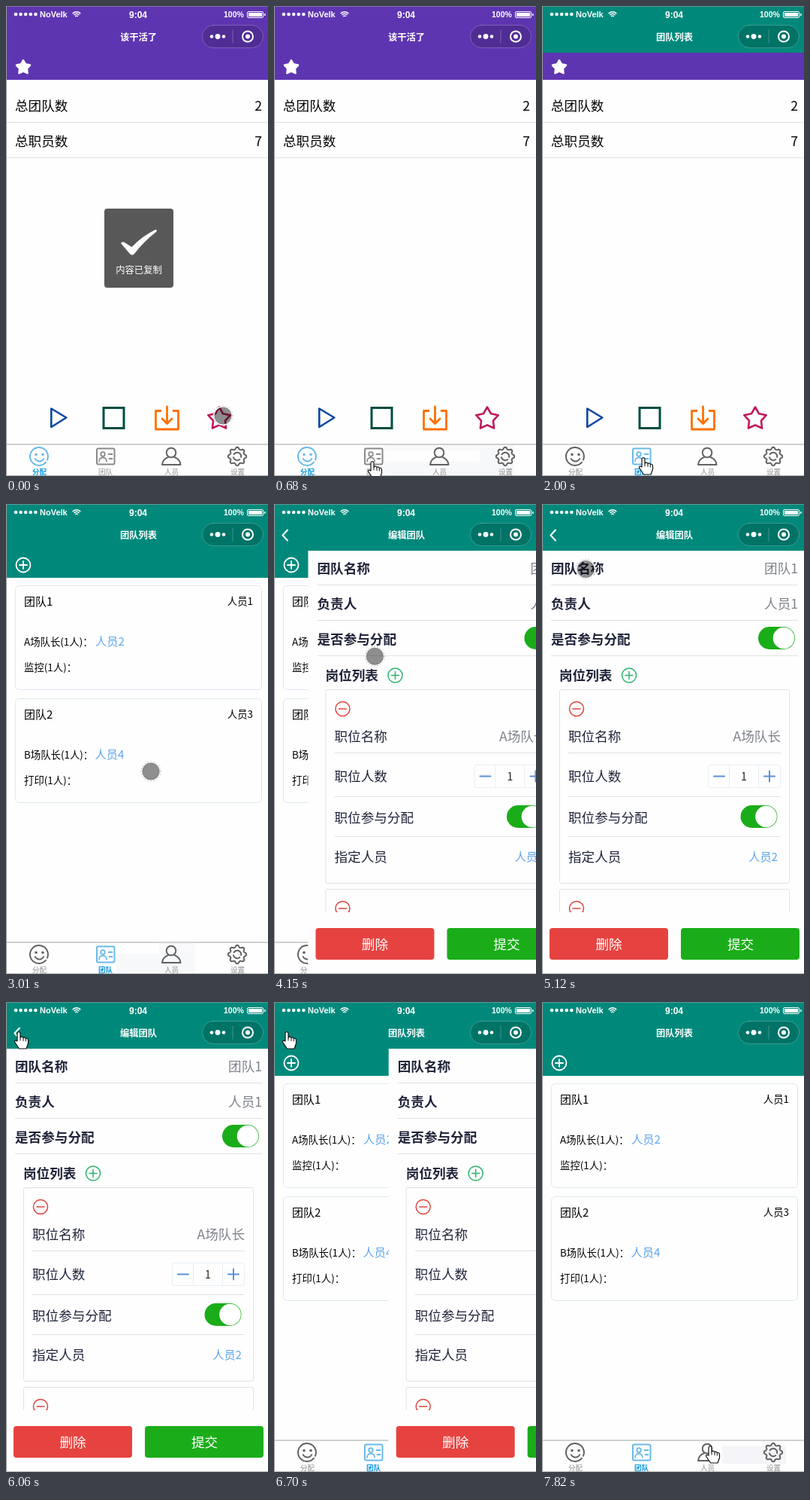
Recreate the animation shown at these times as an HTML page with a canvas. Size 349 px wide and 624 px high, loop 8 s.

```html
<!DOCTYPE html>
<html lang="zh-CN">
<head>
<meta charset="utf-8">
<style>
html, body { margin: 0; width: 100%; height: 100%; overflow: hidden; background: #fefefe; }
canvas { display: block; }
</style>
</head>
<body>
<canvas id="stage" width="349" height="624"></canvas>
<script>
const c = document.getElementById('stage').getContext('2d');
const LOOP = 8000, TAU = Math.PI * 2;
const PAGE = '#fefefe', TEAL = '#00897b', PURPLE = '#5e35b1', GREEN = '#1aad19';
const RED = '#e64340', LINK = '#5ea5ee', GREY = '#7f828c', NAVY = '#20243a';
const CJK = '"Noto Sans CJK SC", "Noto Sans CJK", "Noto Sans CJK JP", sans-serif';
const LATIN = '"Liberation Sans", Arial, sans-serif';

// Bursts of movement: start, end, number of steps.
const bursts = [[120, 830, 6], [1110, 1370, 3], [2000, 3010, 8], [3170, 3450, 3],
  [3990, 4990, 8], [5120, 6060, 8], [6580, 7540, 8], [7660, 7820, 2]];
// Pointer path: time, x, y.
const path = [[0, 289, 544], [688, 131, 604], [830, 117, 603], [1370, 135, 599], [2280, 135, 599],
  [3010, 193, 355], [3450, 125, 117], [3990, 125, 117], [4419, 153, 373], [4990, 64, 93],
  [6060, 17, 39], [6580, 17, 39], [7540, 250, 589], [7820, 224, 589]];

function stepped(t) {
  let held = 0;
  for (const [a, b, n] of bursts) {
    if (t < a) break;
    const gap = (b - a) / (n - 1);
    held = a + gap * Math.min(n - 1, Math.floor((t + 10 - a) / gap));
  }
  return held;
}

function pointerAt(t) {
  const i = path.findIndex(p => p[0] >= t);
  if (i < 1) return path[i < 0 ? path.length - 1 : 0].slice(1);
  const [t0, x0, y0] = path[i - 1], [t1, x1, y1] = path[i];
  const k = (t - t0) / (t1 - t0);
  return [x0 + (x1 - x0) * k, y0 + (y1 - y0) * k];
}

function rect(x, y, w, h, fill) { c.fillStyle = fill; c.fillRect(x, y, w, h); }

function shape(draw, fill, stroke, width = 1) {
  c.beginPath();
  draw();
  if (fill) { c.fillStyle = fill; c.fill(); }
  if (stroke) { c.strokeStyle = stroke; c.lineWidth = width; c.stroke(); }
}

function box(x, y, w, h, r, fill, stroke, width) {
  shape(() => c.roundRect(x, y, w, h, r), fill, stroke, width);
}

function circle(x, y, r, fill, stroke, width) {
  shape(() => c.arc(x, y, r, 0, TAU), fill, stroke, width);
}

function arc(x, y, r, a, b, stroke, width) {
  shape(() => c.arc(x, y, r, a, b), null, stroke, width);
}

function line(points, stroke, width, fill, closed) {
  shape(() => {
    for (let i = 0; i < points.length; i += 2) c.lineTo(points[i], points[i + 1]);
    if (closed) c.closePath();
  }, fill, stroke, width);
}

// y is the middle of the glyphs.
function text(s, x, y, size, color, align = 'left', weight = 400, family = CJK) {
  c.font = `${weight} ${size}px ${family}`;
  c.textAlign = align;
  c.fillStyle = color;
  c.fillText(s, x, y + size * 0.38);
}

function star(x, y, r, fill, stroke, width) {
  const points = [];
  for (let i = 0; i < 10; i++) {
    const a = i * TAU / 10 - TAU / 4, d = i % 2 ? r * 0.54 : r;
    points.push(x + d * Math.cos(a), y + d * Math.sin(a));
  }
  line(points, stroke, width, fill, true);
}

function sign(x, y, arm, color, width, plus) {
  line([x - arm, y, x + arm, y], color, width);
  if (plus) line([x, y - arm, x, y + arm], color, width);
}

function roundSign(x, y, color, plus, width = 1.5) {
  circle(x, y, 9.5, null, color, width);
  sign(x, y, 5, color, width, plus);
}

function toggle(x, y) {
  box(x, y, 49, 30, 15, GREEN);
  circle(x + 34, y + 15, 14.3, '#fff');
}

function header(title, color, back) {
  rect(0, 0, 349, 62, color);
  for (let i = 0; i < 5; i++) circle(13 + i * 6.6, 11, 2.3, '#fff');
  text('NoVelk', 45, 11, 11, '#fff', 'left', 700, LATIN);
  for (const r of [2, 4.6, 7.2]) arc(94, 15, r, -2.3, -0.84, '#fff', 1.5);
  text('9:04', 176, 11, 12, '#fff', 'center', 700, LATIN);
  text('100%', 290, 11.5, 10.5, '#fff', 'left', 700, LATIN);
  box(321.5, 7.5, 21, 8, 1.5, null, '#fff');
  rect(323, 9, 18, 5, '#fff');
  rect(344, 10, 1.5, 3, '#fff');
  text(title, 176.5, 41, 12.3, '#fff', 'center', 700);
  box(261.5, 25.5, 81, 30, 15, 'rgba(0,0,0,.16)', 'rgba(255,255,255,.22)');
  circle(274, 40.5, 2.3, '#fff');
  circle(282, 40.5, 3.4, '#fff');
  circle(290, 40.5, 2.3, '#fff');
  line([302, 32, 302, 49], 'rgba(255,255,255,.25)', 1);
  circle(322, 40.5, 7, null, '#fff', 2);
  circle(322, 40.5, 3, '#fff');
  if (back) line([18, 34.5, 11.5, 41.5, 18, 48.5], '#fff', 2);
}

function homePage() {
  rect(0, 62, 349, 36, PURPLE);
  star(23, 81.5, 9.5, '#fff', '#fff', 2.5);
  [['总团队数', '2', 132], ['总职员数', '7', 179]].forEach(([label, value, y]) => {
    text(label, 12, y, 17.6, '#000');
    text(value, 341, y, 17.6, '#000', 'right');
    rect(0, y + 22, 349, 1, '#e2e2e2');
  });
  line([60.3, 534.5, 60.3, 559, 80.3, 546.5], '#0d47a1', 2.6, null, true);
  c.lineJoin = 'miter';
  line([130, 533.5, 157, 533.5, 157, 560.5, 130, 560.5], '#004d40', 3, null, true);
  c.lineJoin = 'round';
  line([206, 537.5, 199.5, 537.5, 199.5, 562, 229.5, 562, 229.5, 537.5, 223, 537.5], '#ff6f00', 2.8);
  line([214.5, 532, 214.5, 554], '#ff6f00', 2.8);
  line([208, 548, 214.5, 554.5, 221, 548], '#ff6f00', 2.8);
  star(284, 548, 15.5, null, '#c2185b', 2.6);
}

function listPage() {
  rect(0, 62, 349, 36, TEAL);
  roundSign(23, 81, '#fff', true, 1.8);
  const teams = [['团队1', '人员1', 'A场队长(1人)：', '人员2', '监控(1人)：'],
    ['团队2', '人员3', 'B场队长(1人)：', '人员4', '打印(1人)：']];
  teams.forEach(([name, head, post, member, other], i) => {
    const y = 108.5 + i * 150;
    box(12.5, y, 328, 138, 5, null, '#dfe8ee');
    text(name, 24, y + 20.5, 15, '#000');
    text(head, 329, y + 20.5, 13.4, '#000', 'right');
    text(post, 24, y + 74.5, 13.4, '#000');
    text(member, 119 - i * 0.5, y + 74, 15.2, LINK);
    text(other, 24, y + 108.5, 13.4, '#000');
  });
}

function tabBar(active) {
  rect(0, 581, 349, 2, '#d0d0d0');
  ['分配', '团队', '人员', '设置'].forEach((label, i) => {
    text(label, 44.5 + i * 88, 618, 9.5, i === active ? '#1296db' : '#8f8f8f', 'center', i === active ? 700 : 400);
  });
  const tone = (i, idle = '#626262') => i === active ? '#6bb9e8' : idle;
  let k = tone(0);
  arc(44, 598, 12, 0.7, TAU + 0.4, k, 2);
  circle(40, 595.5, 1.8, k);
  circle(49, 595.5, 1.8, k);
  arc(44.5, 598, 6.5, 0.5, 2.64, k, 2);
  k = tone(1, '#8a8a8a');
  box(121, 587.5, 23.5, 21, 2, null, k, 2);
  circle(129, 595, 2.8, null, k, 1.8);
  arc(129, 604.5, 5, Math.PI, TAU, k, 1.8);
  line([136.5, 595, 141.5, 595], k, 1.8);
  line([137.5, 601, 141.5, 601], k, 1.8);
  k = tone(2);
  circle(220, 593, 6.3, null, k, 2);
  shape(() => {
    c.moveTo(216, 599);
    c.quadraticCurveTo(208.5, 602, 208, 609);
    c.lineTo(232.5, 609);
    c.quadraticCurveTo(232, 602, 224.5, 599);
  }, null, k, 2);
  k = tone(3);
  const gear = [];
  for (let a = 0; a < TAU; a += TAU / 64) {
    const r = 10.9 + 1.3 * Math.tanh(2 * Math.cos(8 * a));
    gear.push(308 + r * Math.cos(a), 598 + r * Math.sin(a));
  }
  line(gear, k, 2, null, true);
  arc(308, 598, 5.2, -2.6, 0.2, k, 2);
  arc(308, 598, 5.2, 0.9, 2.9, k, 2);
}

function editPage() {
  rect(0, 62, 349, 562, PAGE);
  [['团队名称', '团队1'], ['负责人', '人员1'], ['是否参与分配', '']].forEach(([label, value], i) => {
    const y = 85.5 + i * 46.8;
    text(label, 12, y, 17.6, NAVY, 'left', 700);
    text(value, 341, y, 17.6, GREY, 'right');
    rect(12, 107 + i * 47, 329, 1, '#e2e2e2');
  });
  toggle(288, 163);
  text('岗位列表', 23, 227, 17.6, NAVY, 'left', 700);
  roundSign(116, 227.5, '#2bb36b', true);
  box(23.5, 246.5, 306, 257, 2, null, '#e2e2e2');
  roundSign(46, 272, '#e0443c');
  [['职位名称', 308], ['职位人数', 361], ['职位参与分配', 416], ['指定人员', 468]]
    .forEach(([label, y]) => text(label, 35, y, 17.6, NAVY));
  for (const y of [330, 388, 441]) rect(35, y, 283, 1, '#e2e2e2');
  text('A场队长', 318, 308, 17.6, GREY, 'right');
  box(221.5, 346.5, 96, 30, 3, null, '#e6eef4');
  rect(249, 347, 1, 29, '#e6eef4');
  rect(288, 347, 1, 29, '#e6eef4');
  sign(236, 361.5, 7, '#5b8fd8', 2);
  sign(303, 361.5, 7, '#5b8fd8', 2, true);
  text('1', 269, 362, 14, '#222', 'center');
  toggle(264.5, 400);
  text('人员2', 314, 468, 15.2, LINK, 'right');
  box(23.5, 511.5, 306, 100, 2, null, '#e2e2e2');
  roundSign(46, 537, '#e0443c');
  rect(0, 542, 349, 82, PAGE);
  box(10, 563, 158, 42, 4, RED);
  box(185, 563, 158, 42, 4, GREEN);
  text('删除', 89, 584.5, 17.6, '#fff', 'center');
  text('提交', 264.5, 584.5, 17.6, '#fff', 'center');
}

function toast() {
  box(131, 269, 92, 105, 4, '#585858');
  shape(() => {
    c.moveTo(153, 315);
    c.quadraticCurveTo(155, 312, 158, 314);
    c.lineTo(167.5, 320);
    c.quadraticCurveTo(182, 305, 199, 297);
    c.quadraticCurveTo(202, 297, 200, 300);
    c.quadraticCurveTo(183, 313, 171, 329);
    c.quadraticCurveTo(168, 332, 165, 329);
    c.closePath();
  }, '#fff');
  text('内容已复制', 177, 350, 12.3, '#fff', 'center');
}

function pointer([x, y]) {
  if (y < 62 || y > 582) {
    c.save();
    c.translate(x, y);
    shape(() => {
      c.moveTo(-2, 2);
      c.quadraticCurveTo(0, -0.8, 2, 2);
      c.lineTo(2, 8);
      c.quadraticCurveTo(4, 6, 6, 8.5);
      c.quadraticCurveTo(8, 7, 9.3, 9.5);
      c.quadraticCurveTo(12, 8.5, 12.5, 11.5);
      c.lineTo(12.5, 16);
      c.lineTo(10, 23);
      c.lineTo(0.5, 23);
      c.lineTo(-5.5, 14);
      c.quadraticCurveTo(-6, 11, -2, 13);
      c.closePath();
    }, '#fff', '#111', 1.2);
    line([2, 8, 2, 12], '#111', 1);
    line([6, 9, 6, 12.5], '#111', 1);
    line([9.3, 10, 9.3, 13], '#111', 1);
    c.restore();
    return;
  }
  circle(x, y, 12, null, '#fff', 2);
  circle(x, y, 11.3, 'rgba(0,0,0,.44)', 'rgba(0,0,0,.2)', 1);
  c.setLineDash([1, 3]);
  circle(x, y, 13, null, '#aaa', 0.8);
  c.setLineDash([]);
}

// Faint press highlight on the tab bar.
function tabTint(t) {
  if (t > 540 && t < 2000) {
    rect(147, 583, 173, 40, '#f7f8fa');
    rect(147, 590, 127, 15, PAGE);
  } else if (t >= 3000 && t < 3990) {
    rect(147, 597, 105, 25, '#f7f8fa');
    rect(204, 583, 48, 14, '#f9f9fb');
  } else if (t >= 7800) {
    rect(240, 589, 85, 24, '#f5f5f9');
  }
}

function draw(now) {
  const t = stepped(now % LOOP);
  const onHome = t < 2280, editing = t >= 3990 && t < 6580;
  rect(0, 0, 349, 624, PAGE);
  c.lineCap = c.lineJoin = 'round';
  tabTint(t);
  if (onHome) homePage(); else listPage();
  tabBar(t < 2000 ? 0 : 1);
  if (t < 400) toast();

  const enter = Math.min(1, Math.max(0, (t - 3890) / 380));
  const leave = Math.min(1, Math.max(0, (t - 6480) / 400));
  const shift = t < 6580 ? 349 * (1 - enter) ** 2 : 349 * (1 - (1 - leave) ** 2);
  if (t >= 3990 && shift < 349) {
    c.save();
    c.translate(shift, 0);
    editPage();
    c.restore();
  }

  if (t < 2000) header('该干活了', PURPLE);
  else header(editing ? '编辑团队' : '团队列表', TEAL, editing);
  rect(0, 0, 1, 624, '#9b9b9b');
  rect(0, 0, 349, 1, 'rgba(160,160,160,.6)');
  rect(0, 623, 349, 1, '#b4b4b4');
  pointer(pointerAt(t));
}

const start = performance.now();
function tick() {
  draw(performance.now() - start);
  requestAnimationFrame(tick);
}
tick();
</script>
</body>
</html>
```
